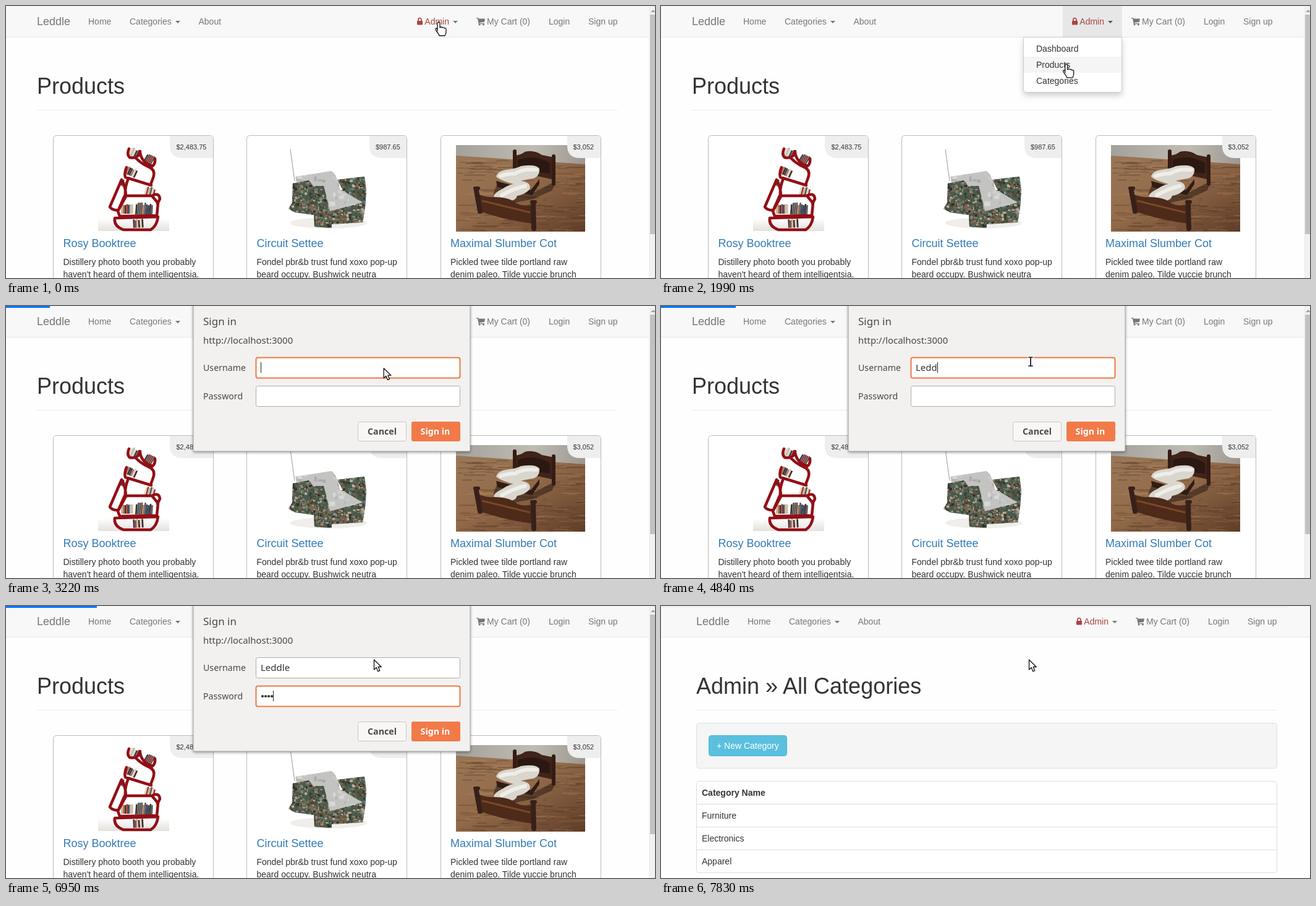
An HTML page for the animation above (8 s loop, 1050 by 440 pixels).

```html
<!DOCTYPE html>
<html lang="en">
<head>
<meta charset="utf-8">
<title>Shop admin sign in</title>
<style>
html, body { margin: 0; width: 100%; height: 100%; overflow: hidden; background: #fefefe; }
svg { display: block; }
text { font: 14px "Liberation Sans", Arial, sans-serif; fill: #333; white-space: pre; }
#nav text { fill: #777; }
#nav .admin { fill: #a94442; }
#nav .brand, .title { font-size: 18px; }
.title { fill: #337ab7; }
.h1 { font-size: 36px; }
.price { font-size: 11px; }
.card { fill: #fff; stroke: #bbb; }
.tag { fill: #eee; }
#dialog text { font: 14.2px "Noto Sans", "Open Sans", sans-serif; fill: #484848; }
#dialog .head { font-size: 17px; }
#dialog .url { font-size: 14.9px; }
#dialog .typed { font-size: 15px; fill: #333; }
#dialog .btn { font-weight: 600; }
.field { fill: #fff; stroke: #b0adaa; }
.focus { stroke: #ee7843; stroke-width: 2; }
.pointer { fill: #fff; stroke: #111; stroke-width: 1.3; stroke-linejoin: round; }
.line { fill: none; stroke-linecap: round; stroke-linejoin: round; }
</style>
</head>
<body>
<svg width="1050" height="440" viewBox="0 0 1050 440">
  <defs>
    <linearGradient id="ground" x2="0" y2="1"><stop stop-color="#fefefe"/><stop offset="1" stop-color="#e4e0dc"/></linearGradient>
    <linearGradient id="wood" x2="1" y2="1"><stop stop-color="#9a7757"/><stop offset=".45" stop-color="#936b4a"/><stop offset="1" stop-color="#5f3d28"/></linearGradient>
    <linearGradient id="wall"><stop stop-color="#a3a19b"/><stop offset=".6" stop-color="#bfbcb4"/><stop offset="1" stop-color="#9c978f"/></linearGradient>
    <filter id="shade" x="-10%" y="-10%" width="120%" height="130%"><feDropShadow dx="0" dy="5" stdDeviation="5" flood-opacity=".18"/></filter>
    <filter id="edge" x="-5%" y="-5%" width="110%" height="110%"><feDropShadow dx="0" dy="1.5" stdDeviation="2" flood-opacity=".4"/></filter>
    <clipPath id="boards"><path d="M464 287l28-6 5 10 18-1 5 14 25-6-9-17 44-5 3 24-2 26-4 24-50 3v6l-28-2-1-19-30-4-11-6 6-10z"/></clipPath>
    <clipPath id="cushion"><path d="M468 276l58-9q8 2 15 32l5 0 31 19-53 14-6-26-4-15-17 0-7-9-20 3z"/></clipPath>
    <clipPath id="floor"><path d="M728 242l209 14v109H728z"/></clipPath>
  </defs>

  <rect width="1050" height="51" fill="#e7e7e7"/>
  <rect width="1050" height="50" fill="#f8f8f8"/>
  <rect id="open" x="650" width="96" height="50" fill="#e7e7e7"/>

  <g id="nav">
    <text class="brand" x="50" y="31">Leddle</text>
    <text x="133" y="30">Home</text>
    <text x="200" y="30">Categories</text>
    <path d="M274 24h8l-4 4z" fill="#777"/>
    <text x="311.500" y="30">About</text>
    <g fill="#a94442"><rect x="665" y="24" width="9" height="6.5" rx="1"/>
      <path class="line" d="M667 24.500v-2.500a2.500 2.500 0 0 1 5 0v2.500" stroke="#a94442" stroke-width="1.700"/></g>
    <text class="admin" x="677.300" y="30">Admin</text>
    <path id="adminCaret" d="M723 24h8l-4 4z"/>
    <g fill="#777"><path d="M761 19h3l.6 1.500H775l-1 5.500-8 1 .3 1H774v1.200h-9.200L763 20.300h-2z"/>
      <circle cx="766" cy="30.300" r="1.300"/><circle cx="772.500" cy="30.300" r="1.300"/></g>
    <text x="778" y="30">My Cart (0)</text>
    <text x="878" y="30">Login</text>
    <text x="942" y="30">Sign up</text>
  </g>

  <g id="shop">
    <text class="h1" x="50" y="142">Products</text>
    <path d="M50 168.500H990" stroke="#eee"/>
    <rect class="card" x="76.500" y="209.500" width="259" height="260" rx="5"/>
    <rect class="card" x="389.500" y="209.500" width="259" height="260" rx="5"/>
    <rect class="card" x="703.500" y="209.500" width="259" height="260" rx="5"/>

    <rect x="149" y="344" width="115" height="20" fill="url(#ground)"/>
    <g id="books"></g>
    <path class="line" stroke="#930f16" stroke-width="4.500" d="M199 231q-4 9 1 14 9 2 14-3l3-7M217 237q2 16 20 22 5-4 4-12M210 246q10 10 24 16 8 5 4 16l-4 11M195 261q-4 9-2 16l42 13M198 279q-6 14-5 28M187 281l-19 44q4 6 14 5l12-22q0-14-7-27M192 307h44l10 12-2 20-60 1-3-8zM238 306q10-4 11 6l-4 8M176 343q-2 13 14 19h44q10-6 12-21z"/>

    <ellipse cx="522" cy="351" rx="62" ry="9" fill="#efeeea"/>
    <path d="M460 232l7 51" stroke="#999"/>
    <g id="chair"></g>

    <rect x="728" y="225" width="209" height="140" fill="url(#wall)"/>
    <path d="M728 242l209 14v109H728z" fill="url(#wood)"/>
    <g id="planks"></g>
    <path d="M795 287l30 12 25 5 30-16 8-2-4 12-30 14-30 6-36-14z" fill="#2b1a1288"/>
    <path d="M822 242q12-1 17-6 15-4 28 5l20 4v36l-65-14z" fill="#402419"/>
    <path d="M828 249q28-10 52 5v17l-52-6z" fill="#2c1812"/>
    <path class="line" d="M823 235v30M886 243v45" stroke="#351c14" stroke-width="6"/>
    <path d="M793 283l56 15 14-18v8l-12 18-56-13z" fill="#2f1c15"/>
    <path d="M793 276q2-10 22-12 10-1 18-5 24-4 30 4 1 12-10 16-14 2-20 4 18 2 14 14-8 8-20 10-2 8-14 9-16 2-24-6 0-8 14-14 8-6 18-8-22-6-28-12z" fill="#d9d6ce"/>
    <path class="line" d="M858 265q-22-2-34 6-12 0-24 4M840 291q-18 4-38 15" stroke="#efede8" stroke-width="6"/>
    <path d="M763 304q13 6 26 5 26 0 38 11 11 5 25 1l2 31q-40-4-88-20z" fill="#4d2a19"/>
    <path d="M770 315l78 19" stroke="#7a4728" stroke-width="3"/>
    <g class="line" stroke="#38201a" stroke-width="8">
      <path d="M761 299l6 33M853 320l1 40"/><path stroke-width="6" d="M759 295h5M851 317h5"/>
    </g>

    <path class="tag" d="M265 210h66q4 0 4 4v32h-49q-21 0-21-20z"/>
    <path class="tag" d="M588 210h56q4 0 4 4v32h-39q-21 0-21-20z"/>
    <path class="tag" d="M908 210h50q4 0 4 4v32h-33q-21 0-21-20z"/>
    <text class="price" x="275.500" y="232">$2,483.75</text>
    <text class="price" x="598" y="232">$987.65</text>
    <text class="price" x="917.500" y="232">$3,052</text>
    <text class="title" x="92.500" y="390">Rosy Booktree</text>
    <text x="92.500" y="419">Distillery photo booth you probably</text>
    <text x="92.500" y="439">haven't heard of them intelligentsia.</text>
    <text class="title" x="405.500" y="390">Circuit Settee</text>
    <text x="405.500" y="419">Fondel pbr&amp;b trust fund xoxo pop-up</text>
    <text x="405.500" y="439">beard occupy. Bushwick neutra</text>
    <text class="title" x="719" y="390">Maximal Slumber Cot</text>
    <text x="719" y="419">Pickled twee tilde portland raw</text>
    <text x="719" y="439">denim paleo. Tilde yuccie brunch</text>

    <rect x="1040" width="10" height="440" fill="#f1f1f1"/>
    <rect x="1042" y="14" width="8" height="355" fill="#c1c1c1"/>
    <path d="M1043 10l4-4 3 3v1z" fill="#a3a3a3"/>
  </g>

  <g id="list">
    <text class="h1" x="57" y="142">Admin » All Categories</text>
    <path d="M57 168.500H997" stroke="#eee"/>
    <rect x="57.500" y="189.500" width="939" height="73" rx="4" fill="#f5f5f5" stroke="#e0e0e0"/>
    <rect x="77.500" y="209.500" width="126" height="33" rx="4" fill="#5bc0de" stroke="#46b8da"/>
    <text x="90" y="231" style="fill:#fff">+ New Category</text>
    <rect x="57.500" y="283.500" width="939" height="148" rx="4" fill="#fff" stroke="#ddd"/>
    <path d="M58 320.500H996M58 357.500H996M58 394.500H996" stroke="#ddd"/>
    <text x="66" y="307" style="font-weight:700">Category Name</text>
    <text x="66" y="344">Furniture</text>
    <text x="66" y="381">Electronics</text>
    <text x="66" y="418">Apparel</text>
  </g>

  <g id="menu">
    <path filter="url(#shade)" d="M586.500 50.500h159v85q0 4-4 4h-151q-4 0-4-4z" fill="#fff" stroke="#ccc"/>
    <rect id="hover" x="587" width="158" height="26" fill="#f5f5f5"/>
    <text x="607" y="74">Dashboard</text>
    <text x="607" y="100">Products</text>
    <text x="607" y="126">Categories</text>
  </g>

  <rect id="bar" height="3" fill="#0076ff"/>

  <g id="dialog">
    <rect x="303" y="-10" width="448" height="245" rx="2" fill="#f2f1f0" stroke="#8f8f8f" stroke-width=".8" filter="url(#edge)"/>
    <text class="head" x="319" y="31">Sign in</text>
    <text class="url" x="319" y="61">http://localhost:3000</text>
    <text x="319" y="105">Username</text>
    <text x="319" y="151">Password</text>
    <rect id="user" class="field" x="404.500" y="83.500" width="330" height="33" rx="3"/>
    <rect id="pass" class="field" x="404.500" y="129.500" width="330" height="33" rx="3"/>
    <text id="name" class="typed" x="412" y="105"></text>
    <g id="dots" fill="#333"><circle cx="415" cy="146" r="2.100"/><circle cx="420" cy="146" r="2.100"/><circle cx="425" cy="146" r="2.100"/><circle cx="430" cy="146" r="2.100"/></g>
    <rect id="caret" width="1" height="17" fill="#222"/>
    <rect x="569.500" y="187.500" width="78" height="31" rx="3" fill="#f8f7f6" stroke="#c9c5c1"/>
    <rect x="656" y="187" width="79" height="32" rx="3" fill="#f27a49"/>
    <text class="btn" x="608.500" y="208" text-anchor="middle">Cancel</text>
    <text class="btn" x="694.500" y="208" text-anchor="middle" style="fill:#fff">Sign in</text>
  </g>

  <g id="cursor">
    <path id="hand" class="pointer" d="M-2 14V2a2 2 0 0 1 4 0v7q2-2 4 0 2-1 3 1 3-1 3 2v4q0 3-2 6h-9q-1-3-5-8-2-3 0-4 2 0 2 4z"/>
    <path id="fist" class="pointer" d="M-2 10V2a2 2 0 0 1 4 0v1q2-2 4 0 2-1 3 1 3-1 3 2v4q0 3-2 6h-9q-1-3-5-6-2-3 0-4 2 0 2 4z"/>
    <path id="arrow" class="pointer" d="M0 0v16l3.700-3.400 2.600 6.200 3-1.300-2.600-6h5z"/>
    <g id="beam" class="line"><path stroke="#fff" stroke-width="4" d="M-3-7h6M0-7v14M-3 7h6"/><path stroke="#111" stroke-width="1.700" d="M-3-7h6M0-7v14M-3 7h6"/></g>
  </g>
</svg>
<script>
const $ = id => document.getElementById(id);
const show = (id, on) => $(id).style.display = on ? '' : 'none';

let seed = 7;
const rand = n => (seed = seed * 16807 % 2147483647) / 2147483647 * n;
const pick = list => list[Math.floor(rand(list.length))];
const rect = (x, y, w, h, fill) => `<rect x="${x}" y="${y}" width="${w}" height="${h}" fill="${fill}"/>`;

// Random patches of colour inside a clip shape
function patches(id, clip, x, y, w, h, n, pw, ph, colors) {
  let s = rect(x, y, w, h, colors[0]);
  while (n--) s += rect(x + rand(w), y + rand(h), 1 + rand(pw), 1 + rand(ph), pick(colors));
  $(id).innerHTML += `<g clip-path="url(#${clip})">${s}</g>`;
}
patches('chair', 'boards', 455, 270, 130, 90, 1300, 4, 4, ['#4a5a4c', '#2d302b', '#56735f', '#8d6348', '#8a8a80', '#b9b09e', '#50402f']);
patches('chair', 'cushion', 465, 266, 114, 68, 90, 9, 7, ['#c3c3c1', '#cfcfcd', '#b4b4b2', '#d8d8d6', '#aaaaa8']);
patches('planks', 'floor', 728, 242, 209, 123, 320, 45, 1, ['#0000', '#3f271850', '#c4946a38', '#54352450']);

// Rows of books: left, base, count, height, tilt
const shelf = [[198, 241, 5, 16, 25], [222, 251, 5, 16, 30], [193, 271, 6, 15, 25], [182, 288, 3, 11, 30],
  [186, 336, 7, 16, 0], [209, 337, 10, 20, 4], [223, 305, 6, 15, 14], [206, 359, 6, 16, -3]];
const covers = ['#9b3a2a', '#2c3c55', '#c9b79c', '#3a2a26', '#b9714f', '#dcd6ca', '#555'];
for (const [x, y, n, h, tilt] of shelf) {
  let s = '';
  for (let i = 0; i < n; i++) {
    const tall = h - rand(4);
    s += rect(i * 2.8, -tall, 2.6, tall, pick(covers));
  }
  $('books').innerHTML += `<g transform="translate(${x} ${y}) rotate(${tilt})">${s}</g>`;
}

const barKeys = [[3000, 0], [3320, 103], [3530, 103], [3650, 104], [3980, 104], [4840, 121], [5500, 131],
  [5840, 131], [6610, 145], [6730, 145], [7510, 152], [7610, 152], [7835, 1030], [8000, 1050]];
function along(keys, t) {
  const i = keys.findIndex(k => k[0] > t);
  if (i < 1) return keys[0][1];
  const [a, u] = keys[i - 1], [b, v] = keys[i];
  return u + (v - u) * (t - a) / (b - a);
}
// Progress in n held steps, the first at a and the last at b
function steps(t, a, b, n) {
  return t < a ? 0 : Math.min(n, Math.floor((t - a) / (b - a) * (n - 1) + 1.001)) / n;
}
const count = (times, t) => times.filter(k => t >= k).length;
const nameKeys = [3980, 4200, 4520, 4840, 5060, 5280];
const passKeys = [5840, 6060, 6280, 6610];

function draw(t) {
  const within = (a, b) => t >= a && t < b;
  const menu = within(1320, 2530), listed = t >= 7610;

  show('shop', !listed);
  show('list', listed);
  show('menu', menu);
  show('open', menu);
  $('nav').setAttribute('transform', `translate(${listed ? 7 : 0})`);
  $('adminCaret').setAttribute('fill', menu ? '#555' : '#777');

  // Pointer
  const down = steps(t, 1530, 2210, 7), over = steps(t, 3090, 3320, 3);
  let x = 700 - 62 * down, y = 26 + 95 * down;
  const beam = within(3320, 6730), arrow = t >= 2530 && !beam;
  const fist = within(120, 1530) || within(2210, 2530);
  if (t >= 2530) { x = 637.5 - 39.5 * over; y = 122 - 32 * over; }
  else if (fist) y -= t < 1530 ? 1 : 0;
  if (t >= 6730) { x = 595.5; y = 87; }
  $('cursor').setAttribute('transform', `translate(${x} ${y})`);
  show('hand', t < 2530 && !fist);
  show('fist', fist);
  show('arrow', arrow);
  show('beam', beam);
  const row = Math.floor((y - 56) / 26);
  show('hover', menu && row >= 0);
  $('hover').setAttribute('y', 56 + 26 * Math.max(row, 0));

  // Loading bar
  $('bar').setAttribute('width', along(barKeys, t));
  $('bar').setAttribute('opacity', listed ? Math.max(0, 1 - (t - 7610) / 230) : 1);

  // Sign-in form
  show('dialog', within(2757, 7510));
  const second = t >= 5500, typed = count(passKeys, t);
  $('name').textContent = 'Leddle'.slice(0, count(nameKeys, t));
  [...$('dots').children].forEach((dot, i) => dot.style.display = i < typed ? '' : 'none');
  $('user').setAttribute('class', second ? 'field' : 'field focus');
  $('pass').setAttribute('class', second ? 'field focus' : 'field');
  show('caret', !within(3530, 3980));
  const end = second ? typed * 5 : within(2757, 7510) ? $('name').getComputedTextLength() : 0;
  $('caret').setAttribute('x', Math.round(412 + end));
  $('caret').setAttribute('y', second ? 137 : 91);
}

function tick(now) {
  draw(now % 8000);
  requestAnimationFrame(tick);
}
draw(0);
requestAnimationFrame(tick);
</script>
</body>
</html>
```
